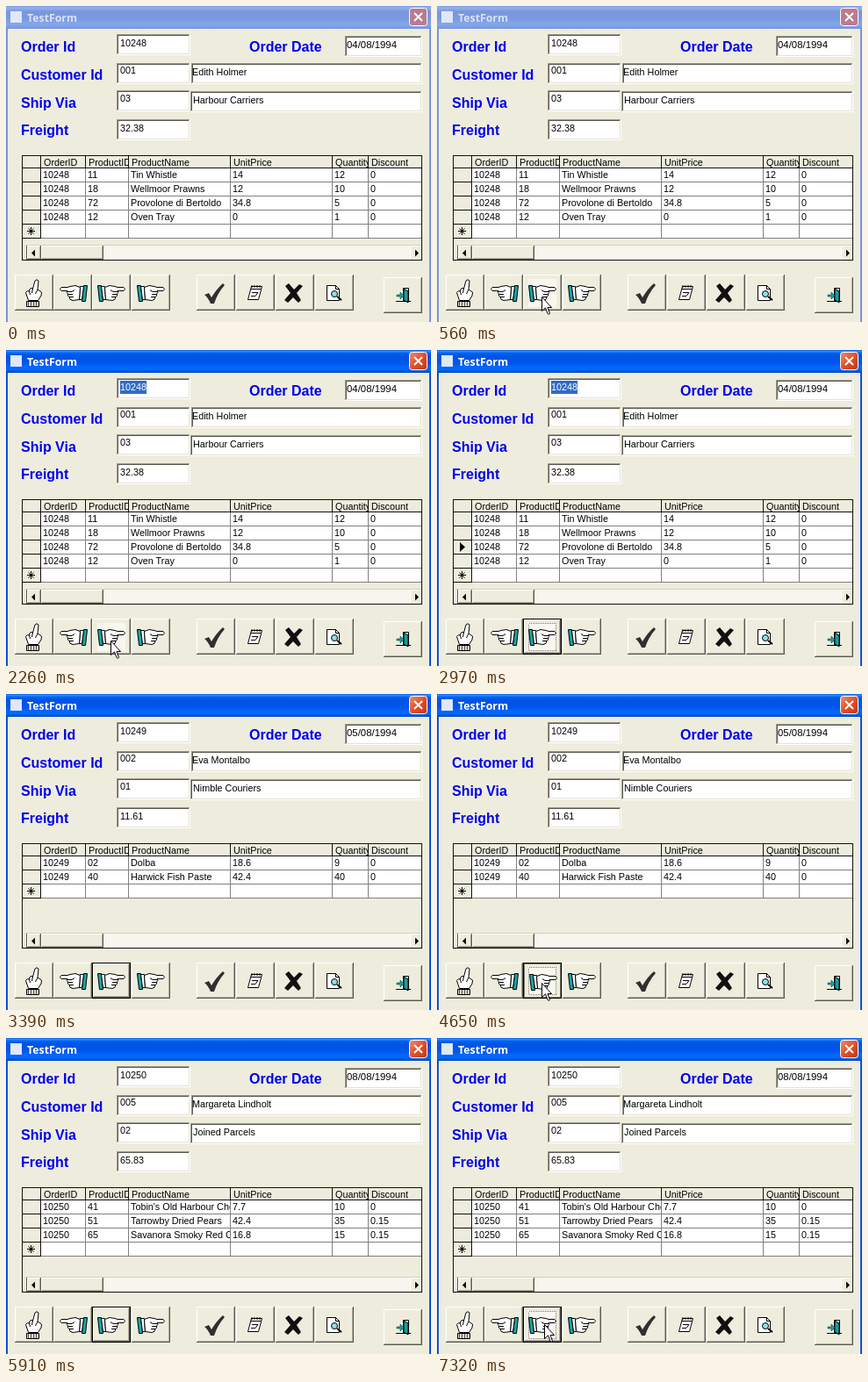
Write an HTML page that moves like this. It is 484 px wide and 360 px high and loops after 8 s.

```html
<!DOCTYPE html>
<html lang="en">
<head>
<meta charset="utf-8">
<title>TestForm</title>
<style>
html, body { margin: 0; width: 100%; height: 100%; overflow: hidden; background: #eeeddd; }
svg { display: block; }
#stage { width: 484px; height: 360px; }
text { font: 10.8px "Liberation Sans", Arial, sans-serif; white-space: pre; }
.title { font: 700 12.3px "Open Sans", sans-serif; fill: #fff; }
.dim { fill: #d8e4f8; }
.label { font: 700 16px "Liberation Sans", Arial, sans-serif; fill: #0000f0; }
.date { font-size: 11.4px; }
.px { shape-rendering: crispEdges; }

.anim { visibility: hidden; animation: 8s step-end infinite; }
#inactive { animation-name: inactive; }
#rec0 { animation-name: rec0; }
#rec1 { animation-name: rec1; }
#rec2 { animation-name: rec2; }
#picked { animation-name: picked; }
#mark { animation-name: mark; }
#focus { animation-name: focus; }
#hover { animation-name: hover; }
#hoverFrame { animation-name: hoverFrame; }
#press { animation-name: press; }
#icon { animation: nudge 8s step-end infinite; }
#cursor { animation-name: cursor; }

@keyframes inactive { 0% { visibility: visible } 10.5%, 100% { visibility: hidden } }
@keyframes rec0 { 0% { visibility: visible } 42.375%, 100% { visibility: hidden } }
@keyframes rec1 { 0%, 73.875%, 100% { visibility: hidden } 42.375% { visibility: visible } }
@keyframes rec2 { 0% { visibility: hidden } 73.875%, 100% { visibility: visible } }
@keyframes picked { 0%, 42.375%, 100% { visibility: hidden } 10.5% { visibility: visible } }
@keyframes focus { 0% { visibility: hidden } 30%, 100% { visibility: visible } }
@keyframes mark {
  0%, 28.25%, 42.375%, 73.875%, 100% { visibility: hidden; transform: none }
  23% { visibility: visible; transform: translateY(16px) }
  37.125% { visibility: visible; transform: translateY(32px) }
  72.125% { visibility: visible; transform: none }
}
@keyframes hover {
  0%, 42.375%, 73.875% { visibility: hidden }
  5.25%, 49.375%, 82.75%, 100% { visibility: visible }
}
@keyframes hoverFrame {
  0%, 42.375%, 73.875% { visibility: hidden }
  30%, 49.375%, 82.75%, 100% { visibility: visible }
}
@keyframes press {
  0%, 61.625%, 91.5%, 100% { visibility: hidden }
  58.125%, 86.25% { visibility: visible }
}
@keyframes nudge {
  0%, 61.625%, 91.5%, 100% { transform: none }
  58.125%, 86.25% { transform: translate(1px, 1px) }
}
@keyframes cursor {
  0%, 37.125%, 66.875% { visibility: hidden; transform: translate(127px, 349px) }
  3.5%, 47.625% { visibility: visible; transform: translate(127px, 349px) }
  5.25% { visibility: visible; transform: translate(120px, 334px) }
  7%, 49.375% { visibility: visible; transform: translate(119px, 331px) }
  52.875% { visibility: visible; transform: translate(119px, 329px) }
  81% { visibility: visible; transform: translate(128px, 353px) }
  82.75% { visibility: visible; transform: translate(123px, 337px) }
  84.5% { visibility: visible; transform: translate(122px, 327px) }
  86.25%, 100% { visibility: visible; transform: translate(122px, 326px) }
}
</style>
</head>
<body>
<svg id="stage" viewBox="0 0 484 360">
  <defs>
    <linearGradient id="bar" x2="0" y2="1">
      <stop offset="0" stop-color="#0058ee"/>
      <stop offset=".05" stop-color="#3090ff"/>
      <stop offset=".14" stop-color="#0262ee"/>
      <stop offset=".24" stop-color="#0054e3"/>
      <stop offset=".56" stop-color="#0055eb"/>
      <stop offset=".78" stop-color="#026afe"/>
      <stop offset=".9" stop-color="#0062ef"/>
      <stop offset="1" stop-color="#0040ab"/>
    </linearGradient>
    <linearGradient id="paleBar" x2="0" y2="1">
      <stop offset="0" stop-color="#7697e7"/>
      <stop offset=".07" stop-color="#97b4e9"/>
      <stop offset=".25" stop-color="#7996de"/>
      <stop offset=".56" stop-color="#7b99e1"/>
      <stop offset=".8" stop-color="#82a9e9"/>
      <stop offset="1" stop-color="#7a93df"/>
    </linearGradient>
    <linearGradient id="red" x2="1" y2="1">
      <stop offset="0" stop-color="#f0906c"/>
      <stop offset=".5" stop-color="#e0502c"/>
      <stop offset="1" stop-color="#c03810"/>
    </linearGradient>
    <g id="hand" stroke="#000" stroke-linejoin="round">
      <path d="M.5 7.500h4l2 18h-4z" fill="#18a8a8"/>
      <path d="M4.500 8.500h4l1 15h-3z" fill="#fff"/>
      <path d="M8.500 9.500L14 7.500L20 8.500L23 9.500H30Q33 11.500 30 13.500H23Q25 15.500 22.500 17Q23.500 19.500 21 20.500Q21 24 17 24.500L9.500 23.500Z" fill="#fff"/>
      <path d="M15 12.500l3 2h5M17 17.500h5M16 20.500h5" fill="none"/>
    </g>
    <g id="up" stroke="#000" stroke-linejoin="round">
      <path d="M9.500 24.500L6.500 15.500Q8 12.500 10.500 14L11 11.500Q13 9.500 14.500 11L17 2Q19 -.5 21 2L20 12L24.500 15L24 19L20.500 24.500Z" fill="#fff"/>
      <path d="M14.500 11l-1 5M10.500 14l1 4M20 12l-2.500 5" fill="none"/>
      <path d="M7.500 25.500h14v6h-14z" fill="#d8d8d0"/>
      <path d="M9.500 26v5M12.500 26v5M15.500 26v5M18.500 26v5" stroke="#555"/>
    </g>
  </defs>
</svg>
<script>
const stage = document.getElementById("stage");
const face = "#eeeddd";

const rect = (x, y, w, h, fill) =>
  `<rect class="px" x="${x}" y="${y}" width="${w}" height="${h}" fill="${fill}"/>`;
const text = (x, y, s, cls = "") => `<text x="${x}" y="${y}" class="${cls}">${s}</text>`;
const path = (d, attrs) => `<path d="${d}" ${attrs}/>`;
const group = (id, body) => `<g id="${id}" class="anim">${body}</g>`;
const use = (id, x, y, more = "") => `<use href="#${id}" transform="translate(${x} ${y}) ${more}"/>`;

// Two-tone edge: top and left in one colour, bottom and right in the other
const edge = (x, y, w, h, light, dark) =>
  rect(x, y, w, 1, light) + rect(x, y, 1, h, light) +
  rect(x, y + h - 1, w, 1, dark) + rect(x + w - 1, y, 1, h, dark);

const raised = (x, y, w, h) =>
  rect(x, y, w, h, face) + edge(x, y, w, h, "#fff", "#5c5a50") +
  edge(x + 1, y + 1, w - 2, h - 2, face, "#aca899");

const box = (x, y, w) =>
  rect(x, y, w, 24, "#fff") + edge(x, y, w, 24, "#9c9a8c", "#fff") +
  edge(x + 1, y + 1, w - 2, 22, "#5c5a50", "#e4e2d4");

const cols = [39, 90, 139, 255, 371, 412, 473];
const heads = ["OrderID", "ProductID", "ProductName", "UnitPrice", "Quantity", "Discount"];
const line = "#101010", thin = "#808080";

// Text cut off at the right side of its column
const cell = (i, y, s, pad = 2) =>
  `<svg x="${cols[i] + 1}" y="${y}" width="${cols[i + 1] - cols[i] - 1}" height="15">${text(pad, 11, s)}</svg>`;

const titleBar = (bar, side, close, cls) =>
  rect(0, 0, 484, 26, bar) + rect(0, 26, 2, 334, side) + rect(482, 26, 2, 334, side) +
  rect(5, 6, 13, 13, "#dfe8f6") + text(24, 18, "TestForm", "title " + cls) +
  `<rect x="459.500" y="2.500" width="20" height="20" rx="3" fill="${close}" stroke="#fff"/>` +
  path("M465 8l9 9m0-9l-9 9", 'stroke="#fff" stroke-width="2"');

function windowFrame() {
  return rect(0, 0, 484, 360, face) +
    titleBar("url(#bar)", "#0a50dc", "url(#red)", "") +
    group("inactive", titleBar("url(#paleBar)", "#7a93df", "#b87c90", "dim"));
}

function fields() {
  const labels = [["Order Id", 17, 52], ["Order Date", 277, 52], ["Customer Id", 17, 84],
    ["Ship Via", 17, 116], ["Freight", 17, 147]];
  return labels.map(([s, x, y]) => text(x, y, s, "label")).join("") +
    [32, 65, 96, 129].map(y => box(126, y, 84)).join("") +
    box(211, 65, 263) + box(210, 97, 264) + box(386, 34, 88);
}

function grid() {
  const arrow = (x, d) => path(`M${x} 277.500v8l${d}-4z`, "");
  return rect(18, 170, 456, 120, line) + rect(19, 171, 454, 118, face) +
    heads.map((s, i) => rect(cols[i], 171, 1, 13, line) + cell(i, 171, s, 3)).join("") +
    rect(19, 184, 454, 1, line) +
    rect(23, 273, 450, 16, "#f6f5ee") + rect(22, 272, 451, 1, "#d2d0c2") +
    rect(23, 273, 1, 16, "#5c5a50") + raised(24, 273, 16, 16) + raised(40, 273, 71, 16) +
    rect(460, 273, 13, 16, "#fff") + rect(461, 274, 12, 15, face) +
    arrow(33, -4) + arrow(466, 4);
}

function record(r) {
  const n = r.rows.length, last = 185 + n * 16;
  const bottom = last + 15;
  let out = text(130, 46, r.id) + text(388, 48, r.date, "date") + text(130, 77, r.cust[0]) +
    text(212, 79, r.cust[1]) + text(130, 109, r.ship[0]) + text(213, 111, r.ship[1]) +
    text(130, 143, r.freight);
  out += rect(40, 185, 433, bottom - 185, "#fff");
  for (let i = 0; i <= n; i++)
    out += rect(19, 200 + i * 16, 21, 1, line) + rect(40, 200 + i * 16, 433, 1, thin);
  cols.slice(0, 6).forEach((x, i) => out += rect(x, 185, 1, bottom - 185, i ? thin : line));
  r.rows.forEach((row, i) =>
    [r.id, ...row].forEach((s, c) => out += cell(c, 185 + i * 16, s)));
  const star = `M28.500 ${last + 3}v9m-4.500-4.500h9m-7.500-3l6 6m0-6l-6 6`;
  return out + path(star, 'stroke="#000"');
}

const records = [
  { id: "10248", date: "04/08/1994", cust: ["001", "Edith Holmer"], ship: ["03", "Harbour Carriers"],
    freight: "32.38", rows: [
      ["11", "Tin Whistle", "14", "12", "0"],
      ["18", "Wellmoor Prawns", "12", "10", "0"],
      ["72", "Provolone di Bertoldo", "34.8", "5", "0"],
      ["12", "Oven Tray", "0", "1", "0"]] },
  { id: "10249", date: "05/08/1994", cust: ["002", "Eva Montalbo"], ship: ["01", "Nimble Couriers"],
    freight: "11.61", rows: [
      ["02", "Dolba", "18.6", "9", "0"],
      ["40", "Harwick Fish Paste", "42.4", "40", "0"]] },
  { id: "10250", date: "08/08/1994", cust: ["005", "Margareta Lindholt"], ship: ["02", "Joined Parcels"],
    freight: "65.83", rows: [
      ["41", "Tobin's Old Harbour Chowder", "7.7", "10", "0"],
      ["51", "Tarrowby Dried Pears", "42.4", "35", "0.15"],
      ["65", "Savanora Smoky Red Chilli", "16.8", "15", "0.15"]] }
];

function buttons() {
  const xs = [10, 54, 98, 143, 217, 262, 307, 352];
  return xs.map(x => raised(x, 306, 44, 41)).join("") + raised(430, 309, 44, 41) +
    use("up", 16, 311) + use("hand", 93, 311, "scale(-1 1)") + use("hand", 149, 311) +
    path("M226 329l5-2 3 5q6-10 13-16l2 2q-8 9-12 21h-4q-3-7-7-10z", 'fill="#303030"') +
    path("M318 319l4-3 6 7 6-6 4 2-7 8 5 8-3 3-6-6-6 6-4-3 7-8z", 'fill="#101010"') +
    // notepad
    path("M279.500 319.500h12l-4 15h-12z", 'fill="#fff" stroke="#000"') +
    path("M279 322.500h11M280 326.500h7l-3 4h-5M280 318v3m3-3v3m3-3v3m3-3v3", 'fill="none" stroke="#000"') +
    // page with lens
    path("M365.500 318.500h10l4 4v13h-14z", 'fill="#fff" stroke="#000"') +
    path("M375.500 318.500v4h4", 'fill="none" stroke="#000"') +
    path("M377 331l5 4", 'stroke="#000" stroke-width="2"') +
    `<circle cx="374" cy="328" r="3.500" fill="#8fe0e0" stroke="#000"/>` +
    // door
    path("M452.500 321.500h6v14h-6z", 'fill="#fff" stroke="#000"') +
    path("M453 322l5 3v13l-5-3z", 'fill="#18a0a0" stroke="#000"') +
    path("M444 336.500h17", 'stroke="#000"') +
    path("M445 329h4v-3l4 4-4 4v-3h-4z", 'fill="#18a0a0" stroke="#064848" stroke-width=".6"');
}

function nextButton() {
  const focus = edge(98, 306, 44, 41, "#000", "#000") +
    edge(99, 307, 42, 39, "#fff", "#5c5a50") + edge(100, 308, 40, 37, face, "#aca899");
  const press = rect(99, 307, 42, 39, face) + edge(99, 307, 42, 39, "#7c7a6e", "#7c7a6e");
  const frame = '<rect class="px" x="104.500" y="311.500" width="31" height="31" fill="none" stroke="#77756a" stroke-dasharray="1 1"/>';
  return group("focus", focus) + group("press", press) +
    group("hover", rect(104, 311, 32, 32, "#f8f7ef")) + group("hoverFrame", frame) +
    `<g id="icon">${use("hand", 104, 311)}</g>`;
}

const picked = rect(130, 35, 30, 15, "#316ac5") +
  '<text x="130" y="46" fill="#fff">10248</text>';
const pointer = path("M.5 .5V16.500L4.500 12.800L7 19.500Q8.500 21 9.500 19.500L7 12.500H11.500Z",
  'fill="#fff" stroke="#000"');

stage.insertAdjacentHTML("beforeend",
  windowFrame() + fields() + grid() +
  records.map((r, i) => group("rec" + i, record(r))).join("") +
  group("picked", picked) +
  group("mark", path("M26 187v11l6-5.500z", "")) +
  buttons() + nextButton() + group("cursor", pointer));
</script>
</body>
</html>
```
